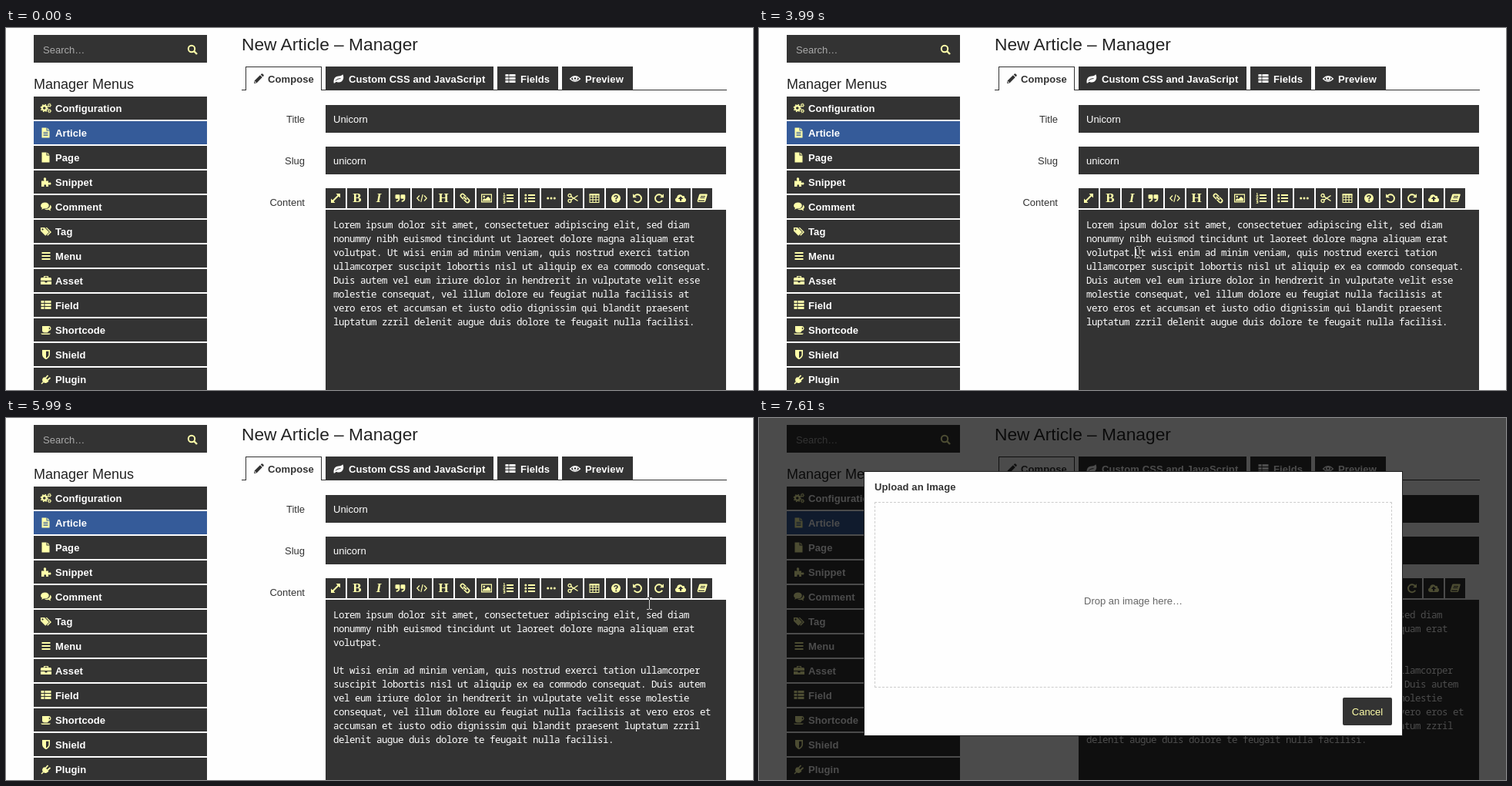
Animation of 970 by 470 pixels, one loop 8000 ms. Source, as an HTML page:

```html
<!DOCTYPE html>
<html lang="en">
<head>
<meta charset="utf-8">
<title>Article manager</title>
<style>
html, body { margin: 0; width: 100%; height: 100%; overflow: hidden; background: #fefefe; }
#stage { position: absolute; left: 0; top: 0; width: 970px; height: 470px; overflow: hidden;
  font: 13px/21px "Liberation Sans", Arial, sans-serif; color: #333; background: #fefefe; }
#stage div, #stage svg { position: absolute; white-space: pre; }
.box { background: #333; }
.on { background: #355b99 !important; }
.pressed { background: #282828; }
.b { font-weight: bold; letter-spacing: .1px; }
.w { color: #fff; }
.y { color: #ffa; }
.h1 { font-size: 22.75px; line-height: 20px; color: #222; }
.h2 { font-size: 18px; line-height: 20px; color: #222; }
.ph { color: #aaa; }
.serif { font: bold 17px/20px "Liberation Serif", Times, serif; width: 26px; text-align: center; }
.tab { box-sizing: border-box; border: 1px solid #333; border-bottom: 0; background: #fefefe; }
#text { left: 425px; top: 247px; color: #fff; letter-spacing: -.5px;
  font: 500 12.5px/18px "Noto Sans Mono", "DejaVu Sans Mono", monospace; }
#caret { width: 1px; height: 15px; background: #fff; }
#shade { left: 0; top: 0; width: 970px; height: 470px; background: rgba(0,0,0,.7); }
#modal { left: 136px; top: 69px; width: 698px; height: 342px; border: 1px solid #222; background: #fefefe; }
#modal .drop { left: 13px; top: 39px; width: 670px; height: 239px; border: 1px dashed #ccc;
  line-height: 255px; text-align: center; color: #666; }
#modal .btn { left: 621px; top: 293px; width: 64px; height: 36px; border-radius: 2px;
  line-height: 37px; text-align: center; }
#beam { mix-blend-mode: difference; }
</style>
</head>
<body>
<div id="stage">
  <div id="page"><div id="text"></div><div id="caret"></div></div>
  <div id="shade"><div id="modal">
    <div class="b" style="left:13px;top:9px">Upload an Image</div>
    <div class="drop">Drop an image here…</div>
    <div class="btn box y">Cancel</div>
  </div></div>
  <svg id="beam" width="7" height="16"><path fill="#fff" d="M0 0h3v1H0zM4 0h3v1H4zM3 1h1v14H3zM0 15h3v1H0zM4 15h3v1H4z"/></svg>
  <svg id="arrow" width="13" height="20"><path fill="#fff" stroke="#111" d="M.5.8v15.400l3.500-3.200 2.500 5.500 2.300-1-2.400-5.300h4.800z"/></svg>
</div>
<script>
const $ = id => document.getElementById(id);
const page = $('page');

// Icon parts on a 14px grid
const fill = d => `<path d="${d}"/>`;
const line = (d, w = 1.5, c = 'currentColor') => `<path d="${d}" fill="none" stroke="${c}" stroke-width="${w}"/>`;
const ring = (x, y, r, w, dash = '') =>
  `<circle cx="${x}" cy="${y}" r="${r}" fill="none" stroke="currentColor" stroke-width="${w}" stroke-dasharray="${dash}"/>`;
const disc = (x, y, r) => `<circle cx="${x}" cy="${y}" r="${r}"/>`;
const gear = (x, y, r) => ring(x, y, r, r * .75) + ring(x, y, r * 1.55, r * .5, r * 1.55 * Math.PI / 8);
const rows = f => [2, 6, 10].map(f).join('');
const sheet = 'M1.500.5h6v4h4v9h-10zM8.500.5l3 3h-3z';
const redo = line('M11.300 4.600A5 5 0 1 0 11.300 9.800', 1.9) + fill('M13 1.200v5H8z');

const icons = {
  search: ring(6, 6, 4.2, 2) + line('M9 9l4 4', 2.4),
  cogs: gear(4.800, 7, 2.900) + gear(11.400, 3.300, 1.500) + gear(11.400, 10.700, 1.500),
  text: fill(sheet + 'M3.500 6v1h6V6zM3.500 8v1h6V8zM3.500 10v1h6v-1z'),
  file: fill(sheet),
  puzzle: fill('M1 5.500h3.700C3.200 3 4 1.300 5.500 1.300S7.800 3 6.700 5.500H10V8c2-1 3.500-.5 3.500 1s-1.500 2-3.500 1v3H7c.6-2-.2-2.700-1.200-2.700S4 11 4.600 13H1z'),
  comments: fill('M5.500 1.500c7 0 7 8 0 8l-1.500-.1-3 1.300 1-2C-1.500 6.500.2 1.500 5.500 1.500zM12 4.500c2.500 1.500 2.500 4.500.3 5.900l1 2-3-1.300c-2 .3-4 0-5.300-.9 5 0 7.600-2.500 7-5.700z'),
  tags: fill('M0 2h5l6 6-4.800 4.800L0 6.600zM2.500 3.300a1.100 1.100 0 1 0 .1 0zM6.500 2H8l6 6-4.800 4.800-1-1L12 8z'),
  bars: rows(y => fill(`M1.500 ${y}h11v2h-11z`)),
  briefcase: fill('M4 3V1h6v2h2.500q1.500 0 1.500 1.500V7H0V4.500Q0 3 1.500 3zM5.200 3h3.600v-.9H5.200zM0 8h5.500v1.500h3V8H14v4H0z'),
  list: rows(y => fill(`M.500 ${y - 1}h4v3h-4zM5.500 ${y - 1}h8v3h-8z`)),
  coffee: fill('M2 2h8.500c4 0 4 6 .2 6C10 10 9 10.500 7.500 10.500H5C3 10.500 2 9.500 2 8zM10.800 3.500v3c2 0 2-3 0-3zM0 11.500h13q-1 1.500-2.500 1.500h-8Q1 13 0 11.500z'),
  shield: fill('M2 1h10v6c0 3-2.500 5-5 6.300C4.500 12 2 10 2 7zM7 2.700v8.700c2-1.200 3.400-2.500 3.400-4.400V2.700z'),
  plug: fill('M4 4.500l5.800 5.800c-2 2-4 2.300-6 1L1.500 13.500.5 12.500l2.300-2.300c-1.300-2-.8-4 1.200-5.700z') + line('M6 6l3.500-4M8.500 8.500l4-3.500', 1.8) + fill('M5 4l5.500 5.300-2 1.700L3.500 6z'),
  pencil: fill('M1 13l.8-3.700L8.900 2.200l2.900 2.900-7.100 7.100zM2.500 10l-.4 1.900 1.900-.4zM9.700 1.500l1-1q.8-.6 1.500 0l1.300 1.300q.6.7 0 1.500l-1 1z'),
  leaf: fill('M.6 12.500C.2 7 2 4 7 3.600c3-.2 4.300-1.200 5.300-2.400C14.500 5 13 11.500 7 11.500c-1.500 0-2.500-.4-3.500-.5-.8.300-1.300 2-2.900 1.500z') + line('M2.800 9.500C5 7.300 6.500 6.800 9.500 6.600', 1, '#333'),
  eye: line('M.6 7Q7 .4 13.400 7 7 13.600.6 7z', 1.200) + ring(7, 6.500, 2.200, 1.700),
  expand: fill('M7.500 1H13v5.500zM1 7.500V13h5.500z') + line('M3 11l8-8', 2),
  quote: [0, 7].map(x => fill(`M${x + .5} 3.500q0-1.200 1.200-1.200h3.500q1.200 0 1.200 1.200V7c0 3-1.500 4.700-4.700 4.700v-1.800c2 0 2.700-.8 2.700-2.200H${x + 1.700}Q${x + .5} 7.700 ${x + .5} 6.500z`)).join(''),
  code: line('M4 3.500L.8 7 4 10.500M10 3.500L13.200 7 10 10.500M8.200 2.200L5.800 11.800', 1.200),
  link: `<g transform="rotate(45 7 7)">${line('M6.500 4.700H2.200q-2 0-2 2.300t2 2.300h4.300M7.500 4.700h4.300q2 0 2 2.300t-2 2.300H7.500', 1.700)}${line('M4 7h6', 1.700)}</g>`,
  image: fill('M0 1.500h14v11H0zM1.200 2.700v8.600h11.600V2.700z') + disc(3.700, 5, 1.300) + fill('M2 10.500V9l2.200-2 1.300 1.200L9 4.800l3 3v2.700z'),
  ol: rows(y => fill(`M5 ${y}h9v2H5z`)) + line('M1 1l1-.5v4M.5 3.800h3M.7 5.600h2v1.600H1v1.600h2.300M.7 10h2.100v3.300H.7M1 11.600h1.800', .9),
  ul: rows(y => disc(1.800, y + 1, 1.500) + fill(`M5 ${y}h9v2H5z`)),
  dots: [2.700, 7, 11.300].map(x => disc(x, 7, 1.500)).join(''),
  cut: ring(3, 3.500, 2, 1.300) + ring(3, 10.500, 2, 1.300) + line('M4.500 4.700l9 5.800M4.500 9.300l9-5.800', 1.400),
  table: line('M1.100 2h11.800v10.500H1.100zM1 5.500h12M1 9h12M5 2v10.500M9 2v10.500', 1.100) + fill('M.6 1.500h12.800v2H.6z'),
  help: disc(7, 7, 6) + line('M4.900 5.500Q5 3.700 7 3.700t2.100 1.500Q9 6.400 7.200 7.200v1.300M7.200 9.600v1.600', 1.600, '#333'),
  undo: `<g transform="matrix(-1 0 0 1 14 0)">${redo}</g>`,
  redo,
  cloud: fill('M3 12C-.8 12-.8 7 2.200 6.300 2.200 1.700 8 .8 9.500 4.200c2-1 3.200.6 2.600 2.200C15 7 14.600 12 11.500 12zM7 4.500L3.700 8H6v2.500h2.200V8h2.300z'),
  book: fill('M4.500 1.500h8.700q.8.200.5 1.200l-2.400 8q-.4 1.300-1.600 1.300H2q-1.500-.2-1.300-1.700L3 2.800q.3-1.300 1.500-1.300zM5 4v.9h6V4zM4.400 6v.9h6V6zM2.200 9.600q-.6 1.200.6 1.200h6.800l.5-1.200z')
};

const add = html => page.insertAdjacentHTML('beforeend', html);
const box = (x, y, w, h, cls = 'box') => {
  add(`<div class="${cls}" style="left:${x}px;top:${y}px;width:${w}px;height:${h}px"></div>`);
  return page.lastElementChild;
};
const label = (s, x, cy, cls = '') => add(`<div class="${cls}" style="left:${x}px;top:${cy - 10}px">${s}</div>`);
const icon = (name, cx, cy, cls = 'y') =>
  add(`<svg class="${cls}" width="14" height="14" viewBox="0 0 14 14" fill="currentColor" fill-rule="evenodd" style="left:${cx - 7}px;top:${cy - 7}px;overflow:visible">${icons[name]}</svg>`);

// Sidebar
box(36, 9, 225, 36);
label('Search…', 48, 28, 'ph');
icon('search', 242, 28);
label('Manager Menus', 36, 73, 'h2');
[['Configuration', 'cogs'], ['Article', 'text'], ['Page', 'file'], ['Snippet', 'puzzle'],
 ['Comment', 'comments'], ['Tag', 'tags'], ['Menu', 'bars'], ['Asset', 'briefcase'],
 ['Field', 'list'], ['Shortcode', 'coffee'], ['Shield', 'shield'], ['Plugin', 'plug']
].forEach(([name, ico], i) => {
  const y = 89 + 32 * i;
  box(36, y, 225, 30, i == 1 ? 'box on' : 'box');
  icon(ico, 52, y + 15);
  label(name, 64, y + 15, 'b w');
});

// Heading and tabs
label('New Article – Manager', 306, 21, 'h1');
box(306, 80, 630, 1);
[['Compose', 'pencil', 311, 99], ['Custom CSS and JavaScript', 'leaf', 415, 218],
 ['Fields', 'list', 638, 79], ['Preview', 'eye', 722, 92]
].forEach(([name, ico, x, w], i) => {
  box(x, 50, w, i ? 30 : 31, i ? 'box' : 'tab');
  icon(ico, x + 17, 66, i ? 'w' : '');
  label(name, x + (i ? 30 : 29), 66, i ? 'b w' : 'b');
});

// Form
[['Title', 118], ['Slug', 172], ['Content', 226]].forEach(([s, y]) =>
  add(`<div style="right:-388px;top:${y - 10}px">${s}</div>`));
box(415, 100, 520, 36);
label('Unicorn', 425, 118, 'w');
box(415, 154, 520, 36);
label('unicorn', 425, 172, 'w');
let upload;
'expand B I quote code H link image ol ul dots cut table help undo redo cloud book'.split(' ')
  .forEach((name, i) => {
    const x = 415 + 28 * i;
    const button = box(x, 208, 26, 26);
    if (name == 'cloud') upload = button;
    if (icons[name]) icon(name, x + 13, 221);
    else label(name == 'I' ? '<i>I</i>' : name, x, 221, 'serif y');
  });
box(415, 236, 520, 240);
page.append($('text'), $('caret'));

// Editor text, wrapped at 70 columns
const head = 'Lorem ipsum dolor sit amet, consectetuer adipiscing elit, sed diam nonummy nibh euismod tincidunt ut laoreet dolore magna aliquam erat volutpat.';
const tail = 'Ut wisi enim ad minim veniam, quis nostrud exerci tation ullamcorper suscipit lobortis nisl ut aliquip ex ea commodo consequat. Duis autem vel eum iriure dolor in hendrerit in vulputate velit esse molestie consequat, vel illum dolore eu feugiat nulla facilisis at vero eros et accumsan et iusto odio dignissim qui blandit praesent luptatum zzril delenit augue duis dolore te feugait nulla facilisi.';
const wrap = s => s.replace(/(.{1,70})( +|$)/gm, '$1\n');
const edits = [[0, wrap(head + ' ' + tail)], [2970, wrap(head + tail)],
  [4110, wrap(head) + wrap(tail)], [4230, wrap(head) + '\n' + wrap(tail)]];

// Caret: from, to, x, y
const blinks = [[2000, 2570, 488, 284], [2970, 3450, 488, 284], [3990, 4110, 488, 284],
  [4110, 4230, 425, 302], [4230, 4760, 425, 320], [5240, 5770, 425, 302], [6300, 6690, 425, 302]];

// Mouse: start, x, y, number of steps, step length
const moves = [[720, 579, 419, 1, 1], [860, 518, 362, 1, 1], [1010, 489, 291, 10, 54.4],
  [1710, 493, 291, 3, 60], [4700, 502, 291, 4, 46], [5610, 835, 241, 9, 45.3],
  [6017, 875, 215, 7, 45.3], [6335, 873, 228, 2, 45], [7090, 848, 246, 1, 1], [7400, 226, 456, 3, 70]];
const PRESS = 6690, OPEN = 6830, GONE = 7610, LOOP = 8000;

const last = (list, t) => list.findLastIndex(e => e[0] <= t);
const place = (el, x, y) => { el.style.left = x + 'px'; el.style.top = y + 'px'; };
const show = (el, on) => { el.style.display = on ? 'block' : 'none'; };

function mouseAt(t) {
  const i = last(moves, t);
  if (i < 0 || t >= GONE) return null;
  const [t0, x, y, n, dt] = moves[i];
  const [, px, py] = moves[Math.max(0, i - 1)];
  const f = Math.min(n, Math.floor((t - t0) / dt) + 1) / n;
  const e = f * f * (3 - 2 * f);
  return [Math.round(px + (x - px) * e), Math.round(py + (y - py) * e)];
}

let shown = -1;
function draw(t) {
  const k = last(edits, t);
  if (k != shown) $('text').textContent = edits[shown = k][1];

  const c = blinks.find(b => t >= b[0] && t < b[1]);
  show($('caret'), c);
  if (c) place($('caret'), c[2], c[3]);

  upload.className = t >= PRESS && t < OPEN ? 'pressed' : 'box';
  show($('shade'), t >= OPEN);

  const m = mouseAt(t);
  const typing = m && t < OPEN && m[1] >= 236;
  show($('beam'), typing);
  show($('arrow'), m && !typing);
  if (typing) place($('beam'), m[0] - 3, m[1] - 8);
  else if (m) place($('arrow'), m[0], m[1]);
}

const start = performance.now();
(function tick() {
  draw((performance.now() - start) % LOOP);
  requestAnimationFrame(tick);
})();
</script>
</body>
</html>
```
